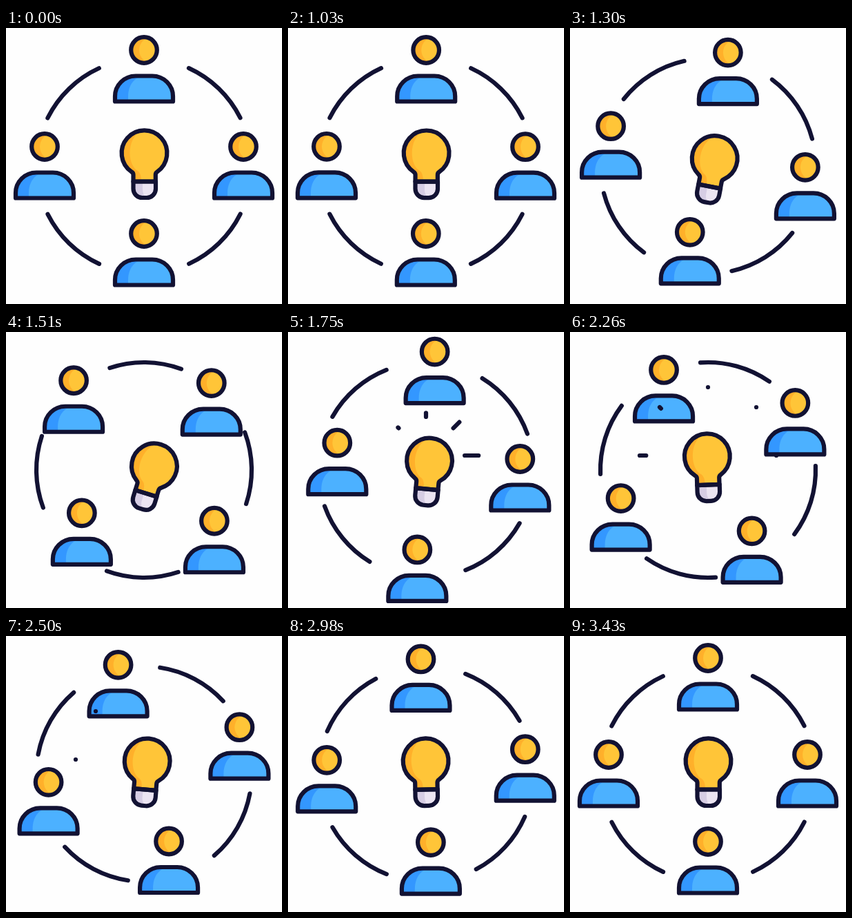
Recreate the animation shown at these times as an HTML page. Size 400x400 px, loop 3460 ms.

```html
<!DOCTYPE html>
<html lang="en">
<head>
<meta charset="utf-8">
<title>Idea sharing</title>
<style>
  html, body { margin: 0; height: 100%; overflow: hidden; background: #fefefe; }
  svg { display: block; width: 100%; height: 100%; }
  .ink { fill: none; stroke: #121233; stroke-width: 6.2; stroke-linecap: round; stroke-linejoin: round; }
</style>
</head>
<body>
<svg viewBox="0 0 400 400">
  <defs>
    <path id="torso" d="M-42 46.5V39A30 29.5 0 0 1-12 9.5H12A30 29.5 0 0 1 42 39V46.5Z"/>
    <circle id="head" cy="-28" r="18.8"/>
    <path id="glass" d="M184.5 222.5V212.5Q184.5 210 182 208.5A32.9 32.9 0 1 1 219 208.5Q216.8 210 216.8 212.5V222.5Z"/>
    <path id="cap" d="M184.5 222.5H217V233A13 13 0 0 1 204 246H197.5A13 13 0 0 1 184.5 233Z"/>
    <clipPath id="inTorso"><use href="#torso"/></clipPath>
    <clipPath id="inHead"><use href="#head"/></clipPath>
    <clipPath id="inGlass"><use href="#glass"/></clipPath>
    <clipPath id="inCap"><use href="#cap"/></clipPath>
    <g id="person">
      <use href="#torso" fill="#3397ff"/>
      <path clip-path="url(#inTorso)" fill="#4cb1ff" d="M-23 47V39C-23 23-14 10 2 9H43V47Z"/>
      <use href="#torso" class="ink"/>
      <use href="#head" fill="#ffb02a"/>
      <circle clip-path="url(#inHead)" fill="#ffc538" cx="12" cy="-28" r="19"/>
      <use href="#head" class="ink"/>
    </g>
  </defs>
  <g id="arcs" class="ink"></g>
  <g id="people"></g>
  <g id="bulb">
    <use href="#glass" fill="#ffb02a"/>
    <path clip-path="url(#inGlass)" fill="#ffc538" d="M204 146C174 152 174 198 191 207Q196 210 196 223H240V140Z"/>
    <use href="#cap" fill="#d6cde4"/>
    <path clip-path="url(#inCap)" fill="#ebe4f2" d="M198 222V234Q198 242 204 247H220V222Z"/>
    <use href="#glass" class="ink"/>
    <use href="#cap" class="ink"/>
  </g>
  <g id="rays" class="ink"></g>
</svg>
<script>
const LOOP = 3460, START = 1000, END = 3430, STEP = 30;
const $ = id => document.getElementById(id);
const add = (parent, tag, attrs = {}) => {
  const el = document.createElementNS('http://www.w3.org/2000/svg', tag);
  for (const k in attrs) el.setAttribute(k, attrs[k]);
  return parent.appendChild(el);
};
const clamp = x => Math.min(1, Math.max(0, x));
const smooth = x => (x = clamp(x), x * x * (3 - 2 * x));
// Point at a clockwise angle from twelve o'clock
const polar = (deg, r, cx = 200, cy = 200) => {
  const a = deg * Math.PI / 180;
  return [cx + r * Math.sin(a), cy - r * Math.cos(a)];
};

// Cubic Bezier easing (1/3, 0, x2, 1), solved by bisection
function swing(p, x2 = 0.126) {
  let lo = 0, hi = 1;
  for (let i = 0; i < 30; i++) {
    const s = (lo + hi) / 2, u = 1 - s;
    if (u * u * s + 3 * u * s * s * x2 + s ** 3 < p) lo = s; else hi = s;
  }
  return smooth(lo);
}

// Eased value between [time, value] keys
function track(keys, t) {
  const i = keys.findIndex(k => k[0] > t);
  if (i < 0) return keys[keys.length - 1][1];
  if (!i) return keys[0][1];
  const [t0, a] = keys[i - 1], [t1, b] = keys[i];
  return a + (b - a) * smooth((t - t0) / (t1 - t0));
}

const TILT = [[1000, 0], [1510, 17.2], [2020, -8.8], [2500, 4.9], [2980, -1], [3430, 0]];
const DROP = [[1000, 0], [1510, 11], [2020, -2], [2500, 0]];

for (const from of [24.6, 116.5, 204.6, 296.5]) {
  add($('arcs'), 'path', { d: `M${polar(from, 156)}A156 156 0 0 1 ${polar(from + 38.8, 156)}` });
}
const people = [0, 90, 180, 270].map(() => add($('people'), 'use', { href: '#person' }));
const rays = [90, 45, 0, -45, -90].map(angle => ({ angle, el: add($('rays'), 'path') }));

function drawRay({ angle, el }, i, t) {
  const local = t - 1520 - 60 * i;
  const visible = local > 0 && local < 830;
  el.setAttribute('visibility', visible ? 'visible' : 'hidden');
  const tip = 56 + 43 * smooth(local / 480);
  const tail = 56 + 43 * smooth((local - 220) / 400);
  el.setAttribute('d', `M${polar(angle, tail, 200, 179)}L${polar(angle, tip, 200, 179)}`);
}

function draw(t) {
  const p = clamp((t - START) / (END - START));
  const turn = 180 * swing(p), shift = 14 * smooth(p);
  $('arcs').setAttribute('transform', `rotate(${turn} 200 200)`);
  [140 - shift, 144, 126 + shift, 144].forEach((r, i) =>
    people[i].setAttribute('transform', `translate(${polar(i * 90 + turn, r)})`));
  $('bulb').setAttribute('transform', `translate(0 ${track(DROP, t)}) rotate(${track(TILT, t)} 200.5 230)`);
  rays.forEach((ray, i) => drawRay(ray, i, t));
}

const origin = performance.now();
function tick() {
  const t = (performance.now() - origin) % LOOP;
  draw(Math.floor((t - 10) / STEP) * STEP + 10);
  requestAnimationFrame(tick);
}
tick();
</script>
</body>
</html>
```
